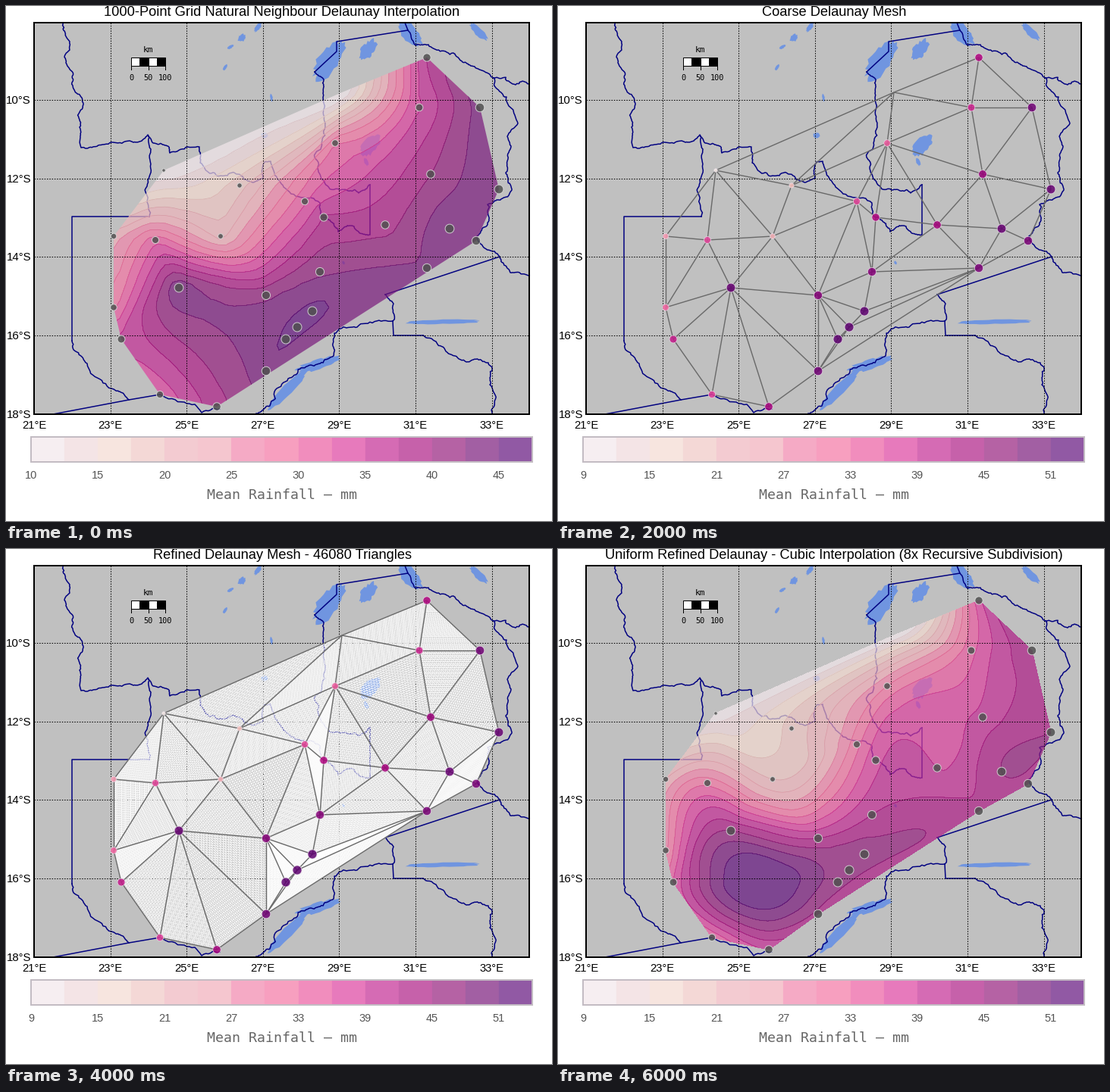
Animation, 720 px wide and 680 px high, one loop 8 s. Source, as a matplotlib script:

```python
import numpy as np
import matplotlib.pyplot as plt
from matplotlib.animation import FuncAnimation
from matplotlib.collections import LineCollection
from matplotlib.colors import to_rgb
from matplotlib.patches import Polygon, Rectangle
from matplotlib.tri import (CubicTriInterpolator, TriAnalyzer, Triangulation,
                            UniformTriRefiner)

W, H, PT = 720, 680, 0.72  # stage size and points per pixel
LEFT, RIGHT, TOP, BOTTOM = 37, 690, 22, 539
NAVY, LAKE, LAND = "#000080", "#7095e0", "#c0c0c0"
MONO = "DejaVu Sans Mono"
OPACITY = 0.7
BANDS = ("#f6eef1 #f4e4e6 #f7e5df #f4d8d6 #f3cbd1 #f5c6cf #f5aac5 #f79fbf "
         "#f18dbd #e77abc #d56bb4 #c661aa #b562a4 #a25fa3 #9159a4").split()
rng = np.random.default_rng(4)

fig = plt.figure(figsize=(W / 100, H / 100), dpi=100, facecolor="white")
ax = fig.add_axes([0, 0, 1, 1])
ax.axis("off")
scenes = [[] for _ in range(4)]

# x, y, rainfall
STATIONS = np.array([
    (555, 68, 38), (545, 134, 35), (625, 134, 44), (434, 181, 30),
    (560, 222, 40), (650, 242, 45), (394, 258, 32), (419, 279, 38),
    (500, 289, 39), (585, 294, 45), (620, 310, 43), (555, 346, 43),
    (414, 351, 42), (343, 382, 42), (404, 403, 46), (384, 424, 46),
    (369, 440, 46), (343, 482, 44), (228, 372, 45), (197, 309, 32),
    (142, 304, 24), (142, 398, 29), (152, 440, 36), (203, 513, 33),
    (278, 529, 39), (283, 304, 21), (308, 237, 19), (208, 217, 10),
    (443, 114, 9)], float)
SWELL = (285, 440, 54)  # crest of the cubic surface between stations


def label(x, y, s, size, color="black", ha="center", font="Liberation Sans"):
    return ax.text(x, y, s, fontsize=size * PT, color=color, ha=ha,
                   va="baseline", family=font, zorder=12)


# ---- map ground -----------------------------------------------------------
def border(*points, sway=0.1):
    """Line through key points, roughened by midpoint displacement."""
    p = np.array(points, float)
    while sway and np.hypot(*np.diff(p, axis=0).T).max() > 5:
        d = np.diff(p, axis=0)
        shift = d[:, ::-1] * (1, -1) * rng.normal(0, sway, (len(d), 1))
        p = np.insert(p, range(1, len(p)), p[:-1] + d / 2 + shift, axis=0)
    ax.plot(*p.T, color=NAVY, lw=1.5 * PT, solid_joinstyle="round", zorder=1)


def lake(x, y, length, width, angle):
    turn = np.linspace(0, 2 * np.pi, 32, endpoint=False)
    size = 0.5 * (1 + rng.normal(0, 0.1, turn.size))
    u, v = length * size * np.cos(turn), width * size * np.sin(turn)
    c, s = np.cos(np.radians(angle)), np.sin(np.radians(angle))
    outline = np.column_stack([x + u * c - v * s, np.maximum(y + u * s + v * c, TOP)])
    ax.add_patch(Polygon(outline, fc=LAKE, ec="none", zorder=0.8))


box = dict(xy=(LEFT, TOP), width=RIGHT - LEFT, height=BOTTOM - TOP)
ax.add_patch(Rectangle(**box, fc=LAND, zorder=0))
ax.add_patch(Rectangle(**box, fill=False, ec="black", lw=2 * PT, zorder=11))

border((75, 22), (84, 47), (79, 75), (88, 105), (102, 130), (97, 160), (99, 187),
       (127, 183), (168, 180), (187, 170), (194, 181), (211, 184), (216, 194),
       (255, 186), (256, 207), (283, 224), (314, 229), (339, 227), (341, 206),
       (349, 205), (366, 239), (414, 260), (417, 278), (432, 287), (438, 298),
       (459, 291), (479, 302))
border((480, 302), (480, 236), sway=0)
border((480, 236), (465, 247), (440, 243), (412, 219), (407, 200), (421, 160),
       (418, 115), (419, 97), (407, 87))
border((407, 87), (436, 60), (436, 47), (530, 32), (526, 22), sway=0)
border((530, 32), (540, 52), (557, 51), (590, 62), (602, 74), (618, 80),
       (643, 95), (672, 104), (690, 103))
border((643, 95), (660, 120), (675, 155), (666, 185), (659, 220), (667, 243),
       (652, 256), (635, 262), (637, 283), (622, 308), (651, 331), (665, 352),
       (690, 356))
border((651, 331), (500, 381), sway=0)
border((500, 381), (511, 393), (510, 416))
border((188, 172), (190, 195), (186, 238), (189, 278))
border((189, 278), (87, 278), (87, 442), sway=0)
border((87, 442), (107, 472), (145, 508), (162, 520))
border((62, 539), (162, 520), (203, 513), sway=0)
border((203, 513), (235, 523), (258, 537), (282, 532))
border((330, 538), (348, 528), (372, 492), (402, 474), (432, 462), (433, 432),
       (463, 424), (510, 416))
border((510, 416), (511, 435), (550, 435), sway=0)
border((550, 435), (578, 452), (607, 470), (636, 471), (638, 500), (641, 539))

lake(426, 72, 62, 24, -58)
lake(532, 36, 40, 20, 50)
lake(477, 58, 30, 17, -50)
lake(623, 34, 30, 10, 45)
lake(311, 42, 11, 8, -45)
lake(332, 28, 14, 6, -55)
lake(296, 54, 9, 4, -30)
lake(289, 81, 9, 4, -60)
lake(341, 171, 9, 7, 0)
lake(350, 121, 10, 3, 80)
lake(480, 184, 32, 19, -50)
lake(475, 206, 10, 5, 70)
lake(445, 339, 5, 3, 60)
lake(372, 506, 72, 13, -45)
lake(412, 473, 56, 13, -17)
lake(576, 417, 95, 6, -1)

dots = dict(color="black", lw=PT, ls=(0, (1.5, 1.8)), zorder=5)
for i in range(7):
    x = LEFT + 100.6 * i
    if i:
        ax.plot([x, x], [TOP, BOTTOM], **dots)
    label(x, 558, f"{21 + 2 * i}°E", 14.8)
for i in range(5):
    y = 124 + 103.7 * i
    if y < BOTTOM - 1:
        ax.plot([LEFT, RIGHT], [y, y], **dots)
    label(33, y + 5, f"{10 + 2 * i}°S", 15, ha="right")

# ---- scale bar ------------------------------------------------------------
for i in range(4):
    ax.add_patch(Rectangle((165 + 11.25 * i, 68), 11.25, 10.5, ec="black",
                           fc="black" if i % 2 else "white", lw=PT, zorder=9))
for km in (0, 50, 100):
    x = 165 + 0.45 * km
    ax.plot([x, x], [78, 84], color="black", lw=PT, zorder=9)
    label(x, 98, str(km), 10.2, font=MONO)
label(187.5, 61, "km", 11, font=MONO)

# ---- colour bar -----------------------------------------------------------
CELL = 661 / len(BANDS)
for i, color in enumerate(BANDS):
    ax.add_patch(Rectangle((33 + i * CELL, 569), CELL, 33, fc=color, ec=color, lw=0.2))
ax.add_patch(Rectangle((33, 569), 661, 33, fill=False, ec="#c3bcc3", lw=2 * PT))
label(364, 651, "Mean Rainfall – mm", 18.3, "#666666", font=MONO)


def bar_ticks(start, step, in_scenes):
    for i in range(8):
        text = label(33 + 2 * i * CELL, 624, str(start + step * i), 14.5, "#555555")
        for s in in_scenes:
            scenes[s].append(text)


bar_ticks(10, 5, [0])
bar_ticks(9, 6, [1, 2, 3])


# ---- triangle meshes ------------------------------------------------------
def build_mesh(points):
    """Delaunay mesh without the slivers along its rim."""
    tri = Triangulation(points[:, 0], points[:, 1])
    flat = TriAnalyzer(tri).get_flat_tri_mask(0.01)
    return Triangulation(tri.x, tri.y, tri.triangles[~flat])


def convex_hull(points):
    tri = Triangulation(points[:, 0], points[:, 1])
    rim = points[tri.triangles[tri.neighbors < 0], :2]
    dx, dy = (rim - rim.mean(axis=0)).T
    return rim[np.argsort(np.arctan2(dy, dx))]


def mesh_lines(tri, **style):
    corners = np.column_stack([tri.x, tri.y])
    return ax.add_collection(LineCollection(corners[tri.edges], **style), autolim=False)


mesh = build_mesh(STATIONS)
fine = UniformTriRefiner(mesh).refine_triangulation(subdiv=5)
scenes[2].append(mesh_lines(fine, colors="white", lw=0.7 * PT, zorder=6))
coarse = mesh_lines(mesh, colors="#696969", lw=1.4 * PT, zorder=7)


# ---- rainfall surfaces ----------------------------------------------------
def natural_neighbour(gx, gy, step=5):
    """Sibson weights, with the Voronoi areas measured on sample points."""
    qx, qy = (a.ravel() for a in np.meshgrid(np.arange(-150, W + 150, step),
                                             np.arange(-150, H + 150, step)))
    reach = np.hypot(qx[:, None] - STATIONS[:, 0], qy[:, None] - STATIONS[:, 1])
    owner_rain = STATIONS[reach.argmin(axis=1), 2]
    reach = reach.min(axis=1)
    z = np.empty(gx.shape)
    for at in np.ndindex(gx.shape):
        gap = reach - np.hypot(qx - gx[at], qy - gy[at])
        weight = np.clip(gap / step + 0.5, 0, 1)
        z[at] = weight @ owner_rain / max(weight.sum(), 1e-9)
    return z


def draw_surface(scene, fill, line, grid, z, levels, clip=None):
    paints = np.array([to_rgb(c) for c in BANDS])
    paints = np.clip((paints - (1 - OPACITY)) / OPACITY, 0, 1)
    z = np.clip(z, levels[0] + 0.01, levels[-1] - 0.01)
    layers = [fill(*grid, z, levels=levels, colors=paints, alpha=OPACITY, zorder=2),
              line(*grid, z, levels=levels[1:-1], colors=paints[1:] * 0.7,
                   alpha=0.4, linewidths=0.7 * PT, zorder=3)]
    for layer in layers:
        if clip is not None:
            layer.set_clip_path(clip)
        scenes[scene].append(layer)


hull = ax.add_patch(Polygon(convex_hull(STATIONS), fc="none", ec="none"))
grid = np.meshgrid(np.arange(130, 665, 10.0), np.arange(58, 545, 10.0))
draw_surface(0, ax.contourf, ax.contour, grid, natural_neighbour(*grid),
             np.arange(10, 47.6, 2.5), hull)

crested = np.vstack([STATIONS, SWELL])
cubic_mesh = build_mesh(crested)
cubic = CubicTriInterpolator(cubic_mesh, crested[:, 2], kind="min_E")
smooth, height = UniformTriRefiner(cubic_mesh).refine_field(
    crested[:, 2], triinterpolator=cubic, subdiv=4)
draw_surface(3, ax.tricontourf, ax.tricontour, [smooth], height, np.arange(9, 54.1, 3))

# ---- stations -------------------------------------------------------------
x, y, rain = STATIONS[:-1].T
area = (2 * PT * (1.2 + 0.104 * rain)) ** 2
gray = ax.scatter(x, y, area, c="#505050", alpha=0.85, edgecolors="#dcdcdc",
                  linewidths=PT, zorder=8)
tinted = ax.scatter(x, y, area, c=rain, cmap="RdPu", vmin=9, vmax=48, alpha=0.85,
                    edgecolors="#e6dce6", linewidths=0.8 * PT, zorder=8)
for s in (0, 3):
    scenes[s].append(gray)
for s in (1, 2):
    scenes[s] += [coarse, tinted]

TITLES = ("1000-Point Grid Natural Neighbour Delaunay Interpolation",
          "Coarse Delaunay Mesh",
          "Refined Delaunay Mesh - 46080 Triangles",
          "Uniform Refined Delaunay - Cubic Interpolation (8x Recursive Subdivision)")
title = label(364, 13, "", 18.3)
ax.set_xlim(0, W)
ax.set_ylim(H, 0)


def update(i):
    for scene in scenes:
        for artist in scene:
            artist.set_visible(False)
    for artist in scenes[i]:
        artist.set_visible(True)
    title.set_text(TITLES[i])
    return []


anim = FuncAnimation(fig, update, frames=4, interval=2000, repeat=True, blit=False)
plt.show()
```
